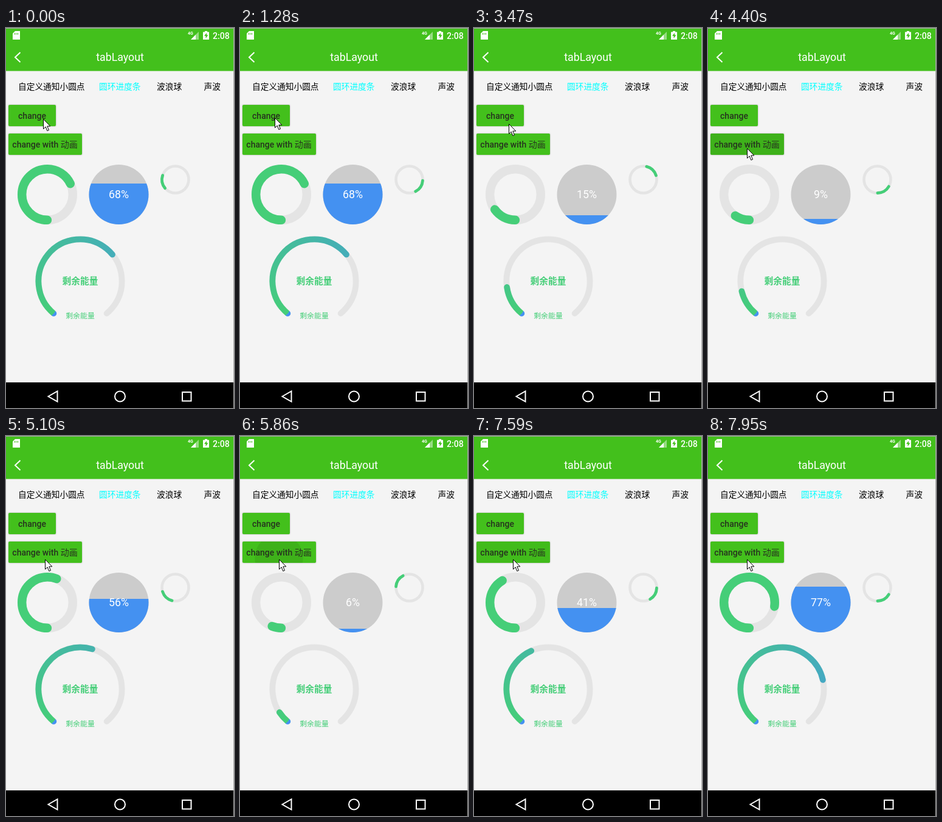
Animation, 375 px wide and 623 px high, one loop 8000 ms. Source, as an HTML page with a canvas:

```html
<!DOCTYPE html>
<html lang="zh">
<head>
<meta charset="utf-8">
<title>tabLayout</title>
<style>
  html, body { margin: 0; width: 100%; height: 100%; overflow: hidden; background: #f4f4f4; }
  canvas, svg { position: absolute; left: 0; top: 0; width: 375px; height: 623px; }
  text { font-family: Roboto, "Noto Sans CJK SC", "Noto Sans CJK", sans-serif; }
  .mid { text-anchor: middle; }
  .tab { font-size: 13.7px; }
  .btn { font-size: 14px; font-weight: 500; fill: #26331f; }
  .card { fill: #43c01c; filter: drop-shadow(0 .5px 1px rgba(0, 0, 0, .3)); }
  .line { fill: none; stroke: #fff; stroke-width: 2; }
</style>
</head>
<body>
<canvas id="dials" width="375" height="623"></canvas>
<svg viewBox="0 0 375 623">
  <defs>
    <clipPath id="ball"><circle cx="185.5" cy="273" r="49"/></clipPath>
    <clipPath id="face"><rect x="4" y="173" width="121" height="35" rx="2"/></clipPath>
  </defs>

  <rect width="375" height="70.5" fill="#43c01c"/>
  <path d="M15 5h8v14H11V9z" fill="#fff"/>
  <path d="M14.5 8v3M17 8v3M19.5 8v3" stroke="#43c01c"/>
  <text x="299" y="11" font-size="7" font-weight="700" fill="#fff">4G</text>
  <path d="M317 6v13h-13z" fill="#fff" opacity=".45"/>
  <path d="M312 11v8h-8z" fill="#fff"/>
  <path d="M327 5h4v1.5h3V19h-10V6.5h3z" fill="#fff"/>
  <path d="M330 8l-4 5h2.5v4l4-5.5H330z" fill="#43c01c"/>
  <text x="340" y="18" font-size="14" font-weight="500" fill="#fff">2:08</text>
  <path class="line" d="M23.5 40l-8.5 8 8.5 8"/>
  <text class="mid" x="187.5" y="54" font-size="17.8" fill="#fff">tabLayout</text>

  <text class="tab" x="20" y="101">自定义通知小圆点</text>
  <text class="tab" x="153" y="101" fill="#0ff">圆环进度条</text>
  <text class="tab" x="248" y="101">波浪球</text>
  <text class="tab" x="325.5" y="101">声波</text>

  <rect class="card" x="4" y="126" width="78" height="35" rx="2"/>
  <text class="btn mid" x="43" y="149">change</text>
  <rect class="card" x="4" y="173" width="121" height="35" rx="2"/>
  <circle id="ripple" cx="64" cy="200" clip-path="url(#face)"/>
  <text class="btn mid" x="64" y="196">change with 动画</text>

  <g clip-path="url(#ball)">
    <rect x="136" y="224" width="99" height="98" fill="#ccc"/>
    <rect id="water" x="136" width="99" height="98" fill="#4491f1"/>
  </g>
  <text id="percent" class="mid" x="185.5" y="279" font-size="17.8" fill="#fff"></text>

  <g class="mid" fill="#45ce78">
    <text x="122" y="420" font-size="14.7" font-weight="700">剩余能量</text>
    <text x="122" y="476" font-size="11.9">剩余能量</text>
  </g>

  <rect y="581" width="375" height="42"/>
  <g class="line">
    <path d="M69.500 604l15-8.500v17z"/>
    <circle cx="187.500" cy="604" r="8.500"/>
    <rect x="290" y="597" width="14.500" height="14.500"/>
  </g>
  <path d="M0 .5h374.500v623" fill="none" stroke="#aaa"/>
  <path id="cursor" d="M.5.5v16l3.700-3.500 2.600 6.500 2.700-1.100-2.700-6.400h5z" fill="#fff" stroke="#000"/>
</svg>
<script>
const LOOP = 8000;
const GREEN = '#45ce78', BLUE = '#4491f1', TRACK = '#e4e4e4';
const HOLD = 120, RATE = .1;   // wait after a restart (ms), then climb (percent per ms)

// Each click: time, ring start, gauge start, end value
const clicks = [[0, 68, 68, 68], [1950, 13, 13, 13], [2250, 27, 27, 27], [2900, 15, 15, 15],
  [4370, 9.4, 13, 56], [5830, 6, 6, 24], [7150, 9.4, 9.4, 82]];
const presses = [4270, 5800, 7060];
const moves = [[300, -4, -2], [1700, 0, 10], [3500, 7, 40], [4600, 0, 5]];   // time, dx, dy
const spin = [[0, 169], [1280, 393], [2550, 567], [4400, 780], [5860, 933], [7180, 1077], [LOOP, 1144]];

const $ = id => document.getElementById(id);
const ctx = $('dials').getContext('2d');
const rad = deg => deg * Math.PI / 180;
const clamp = x => Math.min(1, Math.max(0, x));

function spinAngle(t) {
  const i = spin.findIndex(key => key[0] > t);
  const [t0, a] = spin[i - 1], [t1, b] = spin[i];
  return a + (b - a) * (t - t0) / (t1 - t0);
}

function arc(x, y, r, width, from, sweep, color) {
  ctx.beginPath();
  ctx.arc(x, y, r, rad(from), rad(from + sweep));
  ctx.lineWidth = width;
  ctx.strokeStyle = color;
  ctx.stroke();
}

function drawRipple(t) {
  const age = t - (presses.findLast(p => p <= t) ?? -LOOP);
  $('ripple').setAttribute('r', age * .65);
  $('ripple').setAttribute('opacity', .08 * clamp((600 - age) / 200));
}

function drawCursor(t) {
  let x = 61, y = 149;
  for (const [start, dx, dy] of moves) {
    const k = clamp((t - start) / 400);
    x += dx * k;
    y += dy * k;
  }
  $('cursor').setAttribute('transform', `translate(${x} ${y})`);
}

const fade = ctx.createConicGradient(rad(129.5), 122, 415);
fade.addColorStop(0, GREEN);
fade.addColorStop(1, BLUE);
ctx.lineCap = 'round';

function draw(t) {
  const [time, ring, gauge, end] = clicks.findLast(c => c[0] <= t);
  const climb = Math.max(0, t - time - HOLD) * RATE;
  const level = Math.min(end, ring + climb);
  const energy = Math.min(end, gauge + climb);
  const percent = Math.floor(level);
  ctx.clearRect(0, 0, 375, 623);

  arc(68, 273, 41.8, 14.4, 0, 360, TRACK);
  arc(68, 273, 41.8, 14.4, 90, level * 3.6, GREEN);

  arc(278.5, 248.5, 22, 4.6, 0, 360, TRACK);
  arc(278.5, 248.5, 22, 4.8, spinAngle(t) - 29, 58, GREEN);

  arc(122, 415, 68.6, 9.8, 129.5, 281, TRACK);
  arc(122, 415, 68.6, 9.8, 129.5, energy * 2.81, fade);

  $('water').setAttribute('y', Math.round(322 - percent * .98));
  $('percent').textContent = percent + '%';
  drawRipple(t);
  drawCursor(t);
}

function tick() {
  draw(performance.now() % LOOP);
  requestAnimationFrame(tick);
}
tick();
</script>
</body>
</html>
```
